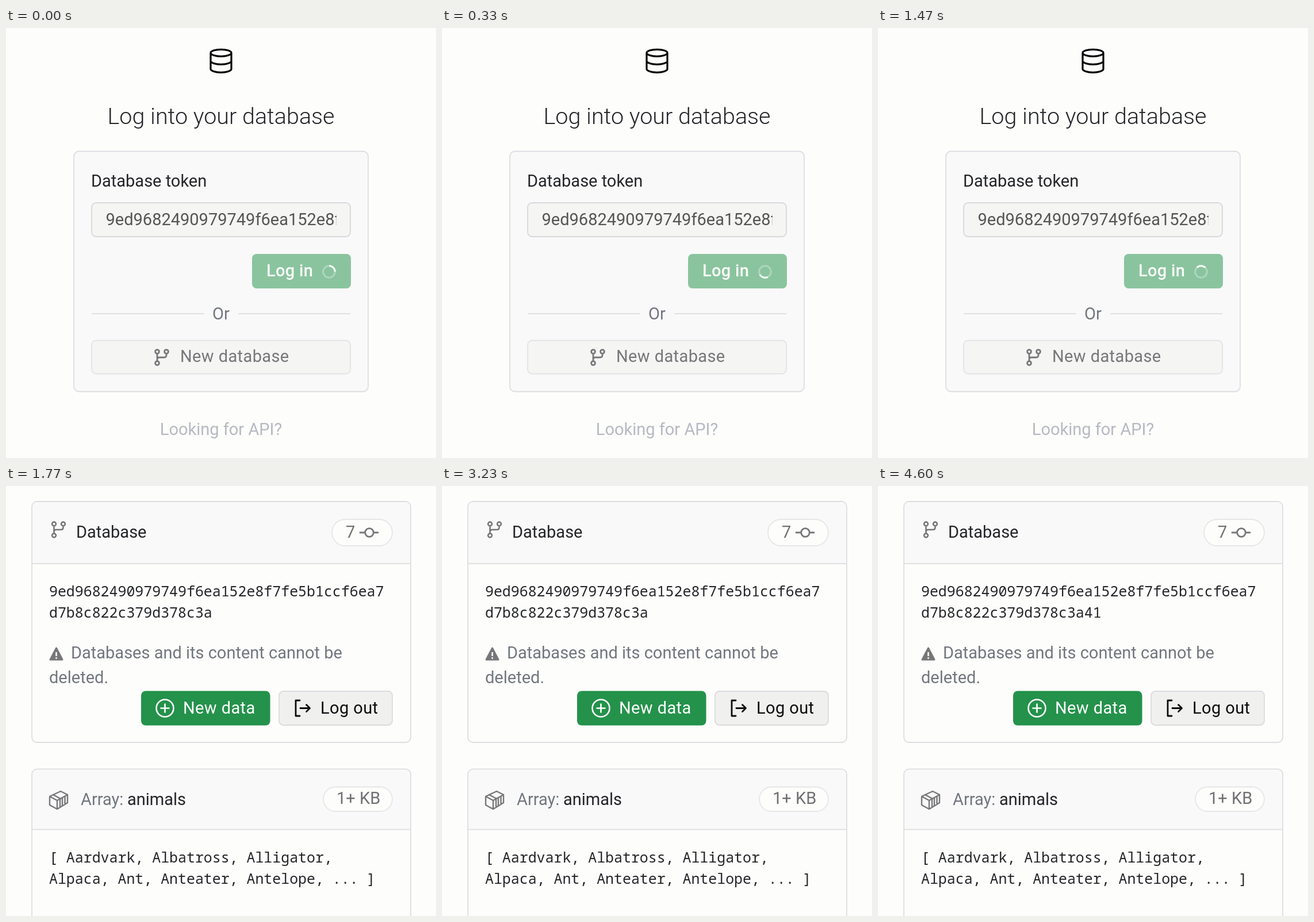
These frames come from a looping animation (748 by 748 pixels, 4.63 s). An HTML page with a canvas:

```html
<!DOCTYPE html>
<html lang="en">
<head>
<meta charset="utf-8">
<title>Database login</title>
<style>
html, body { margin: 0; width: 100%; height: 100%; overflow: hidden; background: #fdfdfb; }
canvas { display: block; width: 748px; height: 748px; }
</style>
</head>
<body>
<canvas id="stage" width="748" height="748"></canvas>
<script>
const ctx = document.getElementById('stage').getContext('2d');
const LOOP = 4630, LOGIN_END = 1535, TOKEN_GROWS = 4000, SPIN = 784;
const SANS = 'Roboto, sans-serif', MONO = '"Noto Sans Mono", monospace';
const PAGE = '#fdfdfb', PANEL = '#f9f9f9', LINE = '#dedee2', INK = '#242529', MUTED = '#72767e', ICON = '#77777a';

function text(str, x, y, color, { size = 29, weight = 400, family = SANS, align = 'left', spacing = 0 } = {}) {
  ctx.font = `${weight} ${size}px ${family}`;
  ctx.letterSpacing = `${spacing}px`;
  ctx.textAlign = align;
  ctx.fillStyle = color;
  ctx.fillText(str, x, y);
}

const mono = (str, x, y) => text(str, x, y, INK, { size: 24.9, family: MONO });

function box(x1, y1, x2, y2, radius, fill, border) {
  ctx.beginPath();
  ctx.roundRect(x1, y1, x2 - x1, y2 - y1, radius);
  ctx.fillStyle = fill;
  ctx.fill();
  if (!border) return;
  ctx.beginPath();
  ctx.roundRect(x1 + 1, y1 + 1, x2 - x1 - 2, y2 - y1 - 2, radius);
  ctx.strokeStyle = border;
  ctx.lineWidth = 1.8;
  ctx.stroke();
}

// Strokes SVG path data placed at x, y and scaled.
function icon(path, x, y, scale, color, width) {
  ctx.save();
  ctx.translate(x, y);
  ctx.scale(scale, scale);
  ctx.lineCap = ctx.lineJoin = 'round';
  ctx.lineWidth = width / scale;
  ctx.strokeStyle = color;
  ctx.stroke(new Path2D(path));
  ctx.restore();
}

function rule(x1, x2, y) {
  ctx.fillStyle = LINE;
  ctx.fillRect(x1, y - 0.9, x2 - x1, 1.8);
}

const ring = (x, y, r) => `M${x - r} ${y}a${r} ${r} 0 1 0 ${2 * r} 0a${r} ${r} 0 1 0 ${-2 * r} 0z`;
const BRANCH = ring(5, 5, 3.4) + ring(21, 5, 3.4) + ring(5, 25, 3.4) + 'M5 8.4V21.6M21 8.4V11Q21 15 17 15H9Q5 15 5 19';
const CYLINDER = 'M3 5a9 3 0 1 0 18 0a9 3 0 1 0-18 0M21 12c0 1.66-4 3-9 3s-9-1.34-9-3M3 5v14c0 1.66 4 3 9 3s9-1.34 9-3V5';
const CRATE = 'M1 10L20 1L32 7V21L14 32L1 25zM1 10L14 17L32 7M14 17V32M19 15V29M23 12.5V26.5M27.5 10V24M7 7L20 14';

function spinner(x, y, t) {
  const start = -Math.PI / 2 + t / SPIN * Math.PI * 2;
  ctx.lineWidth = 3;
  ctx.lineCap = 'butt';
  ctx.strokeStyle = 'rgba(255,255,255,.3)';
  ctx.beginPath();
  ctx.arc(x, y, 10.3, 0, Math.PI * 2);
  ctx.stroke();
  ctx.strokeStyle = 'rgba(255,255,255,.85)';
  ctx.beginPath();
  ctx.arc(x, y, 10.3, start, start + Math.PI / 2);
  ctx.stroke();
}

function loginScreen(t) {
  icon(CYLINDER, 350, 33.3, 2, '#050507', 3.2);
  text('Log into your database', 374, 167, INK, { size: 39.5, weight: 300, align: 'center' });
  box(117, 213.5, 631, 633.5, 9, PANEL, LINE);
  text('Database token', 148, 276, INK);

  box(148, 303, 600, 364, 8, '#f5f5f3', '#d9d9dc');
  ctx.save();
  ctx.beginPath();
  ctx.rect(174, 310, 401, 46);
  ctx.clip();
  text('9ed9682490979749f6ea152e8f7', 173.5, 343, '#555556');
  ctx.restore();

  box(428, 393, 600, 453, 8, '#8ac49f');
  text('Log in', 453, 432, '#fbfdfb', { weight: 500, spacing: 0.3 });
  spinner(562, 424, t);

  rule(149, 344, 497);
  rule(404, 599, 497);
  text('Or', 374, 507, MUTED, { align: 'center' });

  box(148, 542.5, 600, 602.5, 8, '#f5f5f4', '#e4e4e7');
  icon(BRANCH, 258, 558, 1, ICON, 2.8);
  text('New database', 303, 581, '#77777a', { spacing: 0.4 });
  text('Looking for API?', 374, 708, '#b7b9c2', { align: 'center' });
}

function card(top, split, bottom) {
  box(44, top, 705, bottom, 9, PAGE, LINE);
  box(46, top + 2, 703, split, [8, 8, 0, 0], PANEL);
  rule(45, 704, split);
}

function warning() {
  ctx.fillStyle = ctx.strokeStyle = ICON;
  ctx.lineJoin = 'round';
  ctx.lineWidth = 3;
  const triangle = new Path2D('M87.5 282L98 302H77z');
  ctx.fill(triangle);
  ctx.stroke(triangle);
  ctx.fillStyle = PAGE;
  ctx.fillRect(86.2, 289, 2.6, 7);
  ctx.fillRect(86.2, 298, 2.6, 2.6);
}

function databaseScreen(t) {
  card(26, 135, 447);
  icon(BRANCH, 78.5, 61, 1, ICON, 2.6);
  text('Database', 122, 90, INK);
  box(566, 57, 673, 105, 23, PAGE, '#e6e6e8');
  text('7', 591, 90, '#707074');
  icon('M616 81H624M640 81H647' + ring(632, 81, 7.3), 0, 0, 1, ICON, 2.8);

  mono('9ed9682490979749f6ea152e8f7fe5b1ccf6ea7', 75, 192);
  mono('d7b8c822c379d378c3a' + (t >= TOKEN_GROWS ? '41' : ''), 75, 229);

  warning();
  text('Databases and its content cannot be', 113, 300, MUTED);
  text('deleted.', 75, 343, MUTED);

  box(235, 356.5, 459.5, 416.5, 8, '#24924b');
  icon(ring(276.5, 386.5, 15) + 'M276.5 379.5v14M269.5 386.5h14', 0, 0, 1, '#fff', 2.6);
  text('New data', 308, 396, '#fff', { spacing: 0.4 });

  box(474, 356, 673, 417, 8, '#f0f0ef', '#dcdce0');
  icon('M511 373H504V400H511M512 386.5H528M522.5 380.5L528.5 386.5L522.5 392.5', 0, 0, 1, '#0c0c0e', 2.8);
  text('Log out', 547, 396, '#0c0c0e', { spacing: 0.4 });

  card(491.5, 597.5, 780);
  icon(CRATE, 75, 530, 1, ICON, 2.4);
  text('Array:', 130, 555, MUTED);
  text('animals', 211, 555, INK);
  box(551, 522.5, 673, 567, 22, PAGE, '#e6e6e8');
  text('1+ KB', 575, 553, '#707074');
  mono('[ Aardvark, Albatross, Alligator,', 75, 655);
  mono('Alpaca, Ant, Anteater, Antelope, ... ]', 75, 692);
}

function draw() {
  const t = performance.now() % LOOP;
  ctx.fillStyle = PAGE;
  ctx.fillRect(0, 0, 748, 748);
  (t < LOGIN_END ? loginScreen : databaseScreen)(t);
  requestAnimationFrame(draw);
}
draw();
</script>
</body>
</html>
```
